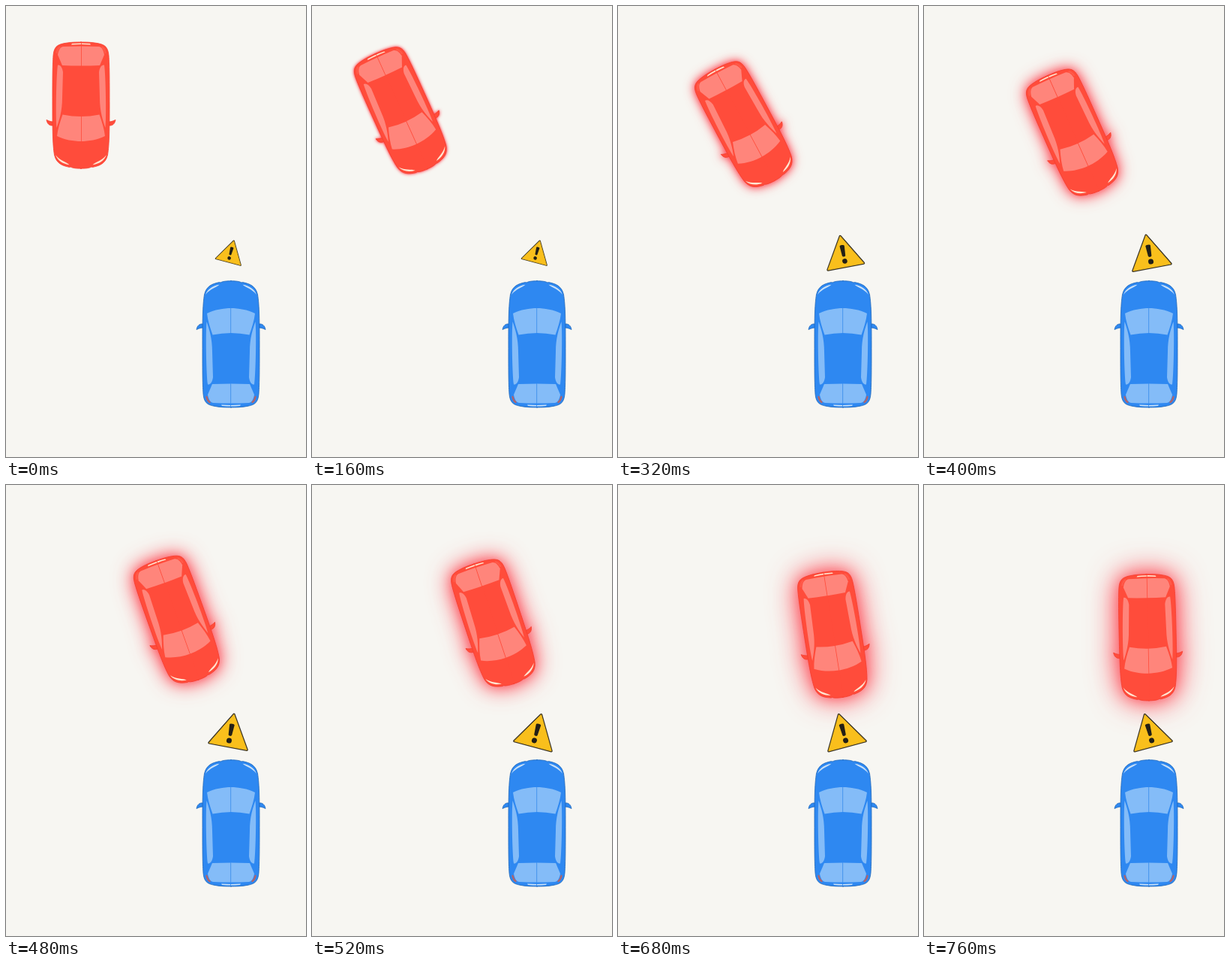
An HTML page for the animation above (0.8 s loop, 400 px wide and 600 px high).

```html
<!DOCTYPE html>
<html lang="en">
<head>
<meta charset="utf-8">
<title>Warning</title>
<style>
  html, body { margin: 0; width: 100%; height: 100%; overflow: hidden; background: #f7f6f2; }
  svg { display: block; width: 400px; height: 600px; }
  .red { --body: #ff4c3b; --edge: #f63f30; --glass: #ff857b; --lamp: #ffe6d2; --tail: #ff5a4a; --seam: none; }
  .blue { --body: #2e88f1; --edge: #1f66b8; --glass: #84bcf8; --lamp: #c9e1f8; --tail: #b0646c; --seam: #6caaec; }
  .body { fill: var(--body); stroke: var(--edge); stroke-width: .8; }
  .glass { fill: var(--glass); }
  .lamp { fill: var(--lamp); }
  .tail { fill: none; stroke: var(--tail); stroke-width: 2.3; stroke-linecap: round; }
  .seam { fill: none; stroke: var(--seam); stroke-width: .7; }
</style>
</head>
<body>
<svg viewBox="0 0 400 600">
  <defs>
    <!-- Left half of a car seen from above, nose up, centred on 0,0 -->
    <g id="half">
      <path class="body" d="M-37-27C-42-27.5-45-25-46-19.5C-43-21-40-22-37-22Z"/>
      <path class="body" d="M1-84.2C-6-84.2-11-83.8-14-82L-15.5-82.4C-25-80.5-33-77.5-35.5-66C-37.8-52-38-30-38 0C-38 30-38 52-37 66C-36 77.5-32 80.5-22 82.4C-14 84 -6 84 1 84" />
      <path class="glass" d="M-32.5-30C-29-20-25-8-25 10L-24 44C-25 51-28 54-31 53.5C-33 40-34-15-32.5-30Z"/>
      <path class="glass" d="M.2-48C-10-48-22-46-32-41C-31-32-28-22-24.500-12.500Q-12-15 .2-15Z"/>
      <path class="glass" d="M.2 52.500Q-13 52.500-25 53L-31 67C-30 73-28 77-24 78Q-12 78.500 .2 78.500Z"/>
      <path class="lamp" d="M-34-66C-31-74-24-78-15.500-79.300C-19-75.500-28-74-34-66Z"/>
      <path class="lamp" d="M.2 80.900Q-7 80.900-13 80.500L-12 82Q-6 82.600 .2 82.600Z"/>
      <path class="tail" d="M-32.500 70Q-31.500 75-28.500 77"/>
    </g>
    <g id="car">
      <use href="#half"/>
      <use href="#half" transform="scale(-1 1)"/>
      <path class="seam" d="M0-48V-15M0 52.500V78.500"/>
    </g>
    <path id="tri" d="M0-21.500L25.500 21.500H-25.500Z" fill="#f9bf1c" stroke-linejoin="round"/>
  </defs>
  <use href="#car" class="blue" transform="translate(300 450)"/>
  <g id="glow"><use id="red" href="#car" class="red"/></g>
  <g id="sign">
    <use href="#tri" stroke="#3a3426" stroke-width="3.400"/>
    <use href="#tri" stroke="#f9bf1c" stroke-width=".9"/>
    <path d="M-3.300-7.500Q-3.300-9 0-9Q3.300-9 3.300-7.500L2.300 6Q2 7.500 0 7.500Q-2 7.500-2.300 6Z" fill="#221f16"/>
    <circle cy="13.800" r="3.500" fill="#221f16"/>
  </g>
</svg>
<script>
const LOOP = 800, STEP = 40;
const $ = id => document.getElementById(id);
const clamp = (v, lo, hi) => Math.min(hi, Math.max(lo, v));
const sine = u => (1 - Math.cos(Math.PI * u)) / 2;
// Eased 0 to 1 while p runs from a to b
const ramp = (p, a, b) => sine(clamp((p - a) / (b - a), 0, 1));

function draw(ms) {
  const p = Math.floor(ms % LOOP / STEP) * STEP / LOOP;

  // Car: slides across on a shallow arc, swerves, then straightens in two stages
  const slide = sine(p - p ** 5 * (1 - p) / 4);
  const x = 100 + 200 * slide;
  const y = 132 + 71 * slide + 2.2 * Math.sin(Math.PI * p);
  const turn = -30 * ramp(p, 0, .28) + 12 * ramp(p, .3, .7) + 18 * ramp(p, .7, 1);
  $('red').setAttribute('transform', `translate(${x} ${y}) rotate(${180 + turn})`);

  const glow = 19 * ramp(p, 0, .95);
  $('glow').style.filter = p
    ? `drop-shadow(0 0 ${glow / 2}px rgba(255,32,48,.4)) drop-shadow(0 0 ${glow}px rgba(255,32,48,.85))`
    : 'none';

  // Sign: grows and rocks from side to side
  const rock = 15 * Math.cos(Math.PI * (clamp(p, .25, .85) - .25) / .2);
  const size = (2 + ramp(p, .25, .45)) / 3;
  $('sign').setAttribute('transform', `translate(300 326.5) rotate(${rock}) scale(${size})`);
}

const start = performance.now();
function tick() {
  draw(performance.now() - start);
  requestAnimationFrame(tick);
}
tick();
</script>
</body>
</html>
```
